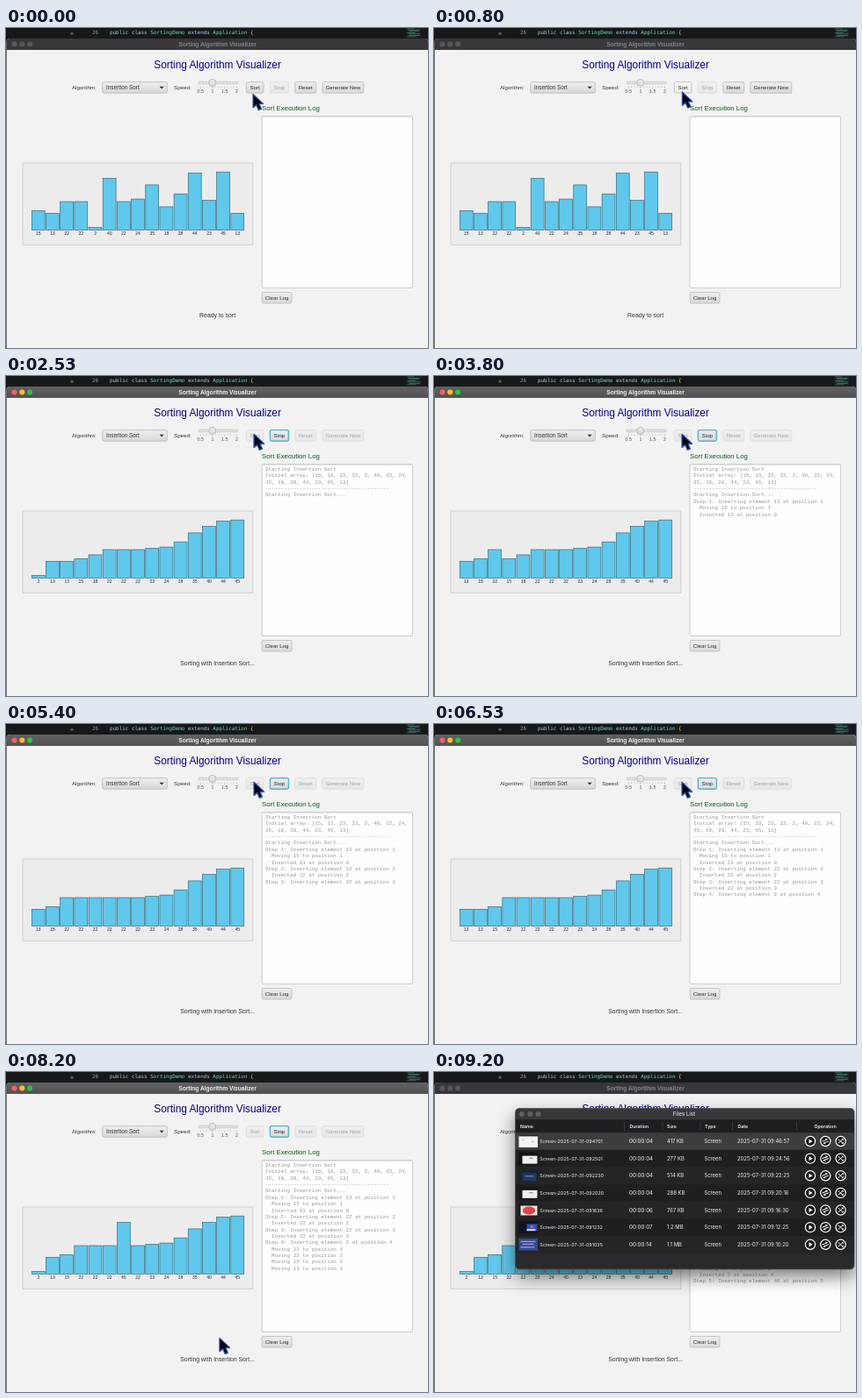
An HTML page for the animation above (9270 ms loop, 480 px wide and 365 px high).

```html
<!DOCTYPE html>
<html lang="en">
<head>
<meta charset="utf-8">
<title>Sorting Algorithm Visualizer</title>
<style>
html, body { margin: 0; width: 100%; height: 100%; overflow: hidden; background: #161819; }
svg { display: block; width: 480px; height: 365px; }
text { font-family: "Liberation Sans", Arial, sans-serif; white-space: pre; }
.mono { font-family: "Liberation Mono", "Courier New", monospace; }
.code { font-family: "DejaVu Sans Mono", monospace; }
.files text { font-family: Inter, "Liberation Sans", sans-serif; }
</style>
</head>
<body>
<script>
const LOOP = 9270, PRESS = 2000, START = 2130, TICK = 500, DIALOG = 9070;
const VALUES = [15, 13, 22, 22, 2, 40, 22, 24, 35, 18, 28, 44, 23, 45, 13];
const NS = "http://www.w3.org/2000/svg";

function add(parent, tag, attrs = {}, content) {
  const node = document.createElementNS(NS, tag);
  for (const key in attrs) node.setAttribute(key, attrs[key]);
  if (content !== undefined) node.textContent = content;
  parent.appendChild(node);
  return node;
}
const rect = (p, x, y, width, height, fill, more = {}) => add(p, "rect", { x, y, width, height, fill, ...more });
const circle = (p, cx, cy, r, fill, more = {}) => add(p, "circle", { cx, cy, r, fill, ...more });
const path = (p, d, more = {}) => add(p, "path", { d, ...more });
const text = (p, x, y, size, fill, str, more = {}) => add(p, "text", { x, y, "font-size": size, fill, ...more }, str);
const middle = { "text-anchor": "middle" };
const show = (node, on) => node.setAttribute("display", on ? "inline" : "none");

const svg = add(document.body, "svg", { viewBox: "0 0 480 365" });
const defs = add(svg, "defs");
function gradient(id, top, bottom) {
  const g = add(defs, "linearGradient", { id, x1: 0, y1: 0, x2: 0, y2: 1 });
  add(g, "stop", { offset: 0, "stop-color": top });
  add(g, "stop", { offset: 1, "stop-color": bottom });
}
gradient("face", "#eeeeee", "#d8d8d8");
gradient("hover", "#fafafa", "#e8e8e8");
gradient("activeBar", "#616163", "#525254");
const blur = add(defs, "filter", { id: "blur", x: "-20%", y: "-30%", width: "140%", height: "160%" });
add(blur, "feGaussianBlur", { stdDeviation: 10 });

// Editor strip behind the window
rect(svg, 0, 0, 480, 365, "#161819");
circle(svg, 75, 6.3, 1.8, "#55585b");
text(svg, 98, 6.6, 5.92, "#9a9fa3", "26", { class: "code" });
const code = add(svg, "text", { x: 118, y: 6.6, "font-size": 5.92, class: "code" });
[["public class ", "#a9d0ec"], ["SortingDemo ", "#68dcc0"], ["extends ", "#a9d0ec"],
 ["Application ", "#68dcc0"], ["{", "#f0d36a"]].forEach(([s, fill]) => add(code, "tspan", { fill }, s));
rect(svg, 455, 0, 17, 11, "#1c2224");
for (let i = 0; i < 7; i++)
  rect(svg, 456.5 + (i % 3), 0.5 + i * 1.5, 8 + (i * 5) % 7, 0.7, i % 2 ? "#3f8a72" : "#4d7076");

// Main window
path(svg, "M.6 365V16Q.6 12 4.6 12H476Q480 12 480 16V365Z", { fill: "#f2f2f2" });
const bar = path(svg, "M.6 25V16Q.6 12 4.6 12H476Q480 12 480 16V25Z");
const lights = [9.5, 18.3, 27.1].map(x => circle(svg, x, 18.5, 3, "#57565a"));
const barTitle = text(svg, 240.5, 20.6, 6.62, "", "Sorting Algorithm Visualizer", { ...middle, "font-weight": 700 });
text(svg, 240.6, 46, 11.85, "#00008b", "Sorting Algorithm Visualizer", middle);

text(svg, 75, 70, 6.15, "#333", "Algorithm:");
text(svg, 191, 70, 6.2, "#333", "Speed:");
const frame = { rx: 1.7, stroke: "#b4b4b4", "stroke-width": 0.7 };
rect(svg, 109.7, 61.6, 73.6, 12.6, "url(#face)", frame);
text(svg, 114, 70, 6.35, "#333", "Insertion Sort");
path(svg, "M174.6 66.7H179.6L177.1 69.5Z", { fill: "#333" });

// Speed slider
rect(svg, 219, 61.2, 45, 2.6, "#e4e4e4", { rx: 1.3, stroke: "#b8b8b8", "stroke-width": 0.6 });
for (let i = 0; i <= 12; i++) {
  const x = 221.3 + i * 3.43;
  path(svg, `M${x} 66.6V${i % 4 ? 68 : 69}`, { stroke: "#999", "stroke-width": 0.5 });
}
["0.5", "1", "1.5", "2"].forEach((s, i) => text(svg, 221.3 + i * 13.7, 73.9, 5.3, "#555", s, middle));
circle(svg, 234.7, 62.4, 4, "url(#face)", { stroke: "#a5a5a5", "stroke-width": 0.7 });

function button(x, y, w, label) {
  const g = add(svg, "g");
  const face = rect(g, x, y, w, 12.6, "url(#face)", frame);
  text(g, x + w / 2, y + 8.5, 6.15, "#2a2a2a", label, middle);
  return { g, face };
}
const sortBtn = button(273.3, 61.6, 19.6, "Sort");
const stopBtn = button(300.4, 61.6, 21, "Stop");
const resetBtn = button(328.7, 61.6, 24, "Reset");
const newBtn = button(359.8, 61.6, 47, "Generate New");
button(291.2, 301.5, 33.8, "Clear Log");

text(svg, 291, 94, 7.8, "#0a5a14", "Sort Execution Log");
rect(svg, 291, 100.7, 171.5, 195.7, "#fefefe", { rx: 1.3, stroke: "#c6c6c6", "stroke-width": 0.9 });
path(svg, "M292 101.5H461.5", { stroke: "#dedede", "stroke-width": 0.8 });
const status = text(svg, 240.6, 330.3, 6.9, "#333", "", middle);

// Bars
rect(svg, 19, 154, 261.8, 93.4, "#ececec", { stroke: "#cbcbcb", "stroke-width": 0.9 });
const BASE = 230.4, PITCH = 16.18;
const bars = VALUES.map((_, i) => ({
  box: rect(svg, 29.3 + i * PITCH, 0, 14.9, 0, "#5fc8ec", { stroke: "#35616f", "stroke-width": 0.65 }),
  label: text(svg, 36.8 + i * PITCH, 236.4, 5, "#222", "", middle)
}));

// Log lines and array writes both advance one per tick; writes land on the sorted array.
const lines = [], writes = [];
const work = VALUES.slice();
for (let i = 1; i < work.length; i++) {
  const key = work[i];
  let j = i;
  const put = (pos, v) => { work[pos] = v; writes.push([pos, v]); };
  lines.push(`Step ${i}: Inserting element ${key} at position ${i}`);
  while (j > 0 && work[j - 1] > key) {
    lines.push(`  Moving ${work[j - 1]} to position ${j}`);
    put(j, work[j - 1]);
    j--;
  }
  lines.push(`  Inserted ${key} at position ${j}`);
  put(j, key);
}
const head = ["Starting Insertion Sort", "Initial array: [" + VALUES.slice(0, 8).join(", ") + ",",
  VALUES.slice(8).join(", ") + "]", "-".repeat(40), "Starting Insertion Sort..."];
const ticks = Math.floor((LOOP - START) / TICK);
const logRows = head.concat(lines.slice(0, ticks)).map((s, i) =>
  text(svg, 295, 108 + i * 7.36, 5.87, "#949494", s, { class: "mono" }));
const sorted = VALUES.slice().sort((a, b) => a - b);

// Files window
const files = add(svg, "g", { class: "files" });
rect(files, 92, 50, 386, 184, "#000", { rx: 5, opacity: 0.5, filter: "url(#blur)" });
rect(files, 92.5, 41.5, 385.5, 183.5, "#2a2a2c", { rx: 4.5, stroke: "#555557", "stroke-width": 0.6 });
path(files, "M92.8 54.5V46Q92.8 41.8 97 41.8H473.5Q477.7 41.8 477.7 46V54.5Z", { fill: "#38373a" });
rect(files, 92.8, 54.5, 384.9, 15, "#1f1f21");
[99.8, 109.3, 118.8].forEach(x => circle(files, x, 48.1, 3, "#5e5e60"));
text(files, 284.5, 50.3, 6, "#c9c9cb", "Files List", { ...middle, "font-weight": 600 });
[["Name", 98], ["Duration", 222.5], ["Size", 265], ["Type", 308], ["Date", 345.5], ["Operation", 432.5]]
  .forEach(([s, x]) => text(files, x, 64.3, 5.25, "#f0f0f0", s, { "font-weight": 600 }));
[216.5, 260, 303, 339.5, 412.5].forEach(x => path(files, `M${x} 57V67`, { stroke: "#4a4a4c", "stroke-width": 0.6 }));

const glyph = { fill: "none", stroke: "#fff", "stroke-width": 1, "stroke-linejoin": "round" };
const headGlyph = { fill: "#fff" };
function icons(y) {
  const [play, swap, mix] = [428, 445.3, 462.6].map(x => add(files, "g", { transform: `translate(${x} ${y})` }));
  [play, swap, mix].forEach(g => circle(g, 0, 0, 5.6, "#161617", { stroke: "#fff", "stroke-width": 1.2 }));
  path(play, "M-1.5 -2.6L2.7 0L-1.5 2.6Z", headGlyph);
  const tilted = add(swap, "g", { transform: "rotate(-22)" });
  path(tilted, "M-3.4 -1.2H1.4M3.4 1.2H-1.4", glyph);
  path(tilted, "M1 -3.1L3.8 -1.2L1 -.4ZM-1 3.1L-3.8 1.2L-1 .4Z", headGlyph);
  path(mix, "M-2.8 -2.4L2.4 2.4M-2.8 2.4L2.4 -2.4", glyph);
  path(mix, "M.8 -3H3.2V-.6ZM.8 3H3.2V.6Z", headGlyph);
}
function thumb(i, y) {
  const box = (x, dy, w, h, fill) => rect(files, 96.5 + x, y - 7 + dy, w, h, fill);
  box(0, 0, 21.5, 14, ["#f6f2f4", "#101412", "#17242f", "#151816", "#151718", "#10141f", "#35488c"][i]);
  if (i === 0) { box(0, 0, 21.5, 1.4, "#2b2b2d"); box(4, 5, 2, 1, "#e89aa4"); box(14, 7, 3, 1, "#e89aa4"); }
  if (i === 1 || i === 3) { box(4, 4, 17, 9, "#f0f0ee"); box(12, 6, 4, 1.5, "#8cab8c"); }
  if (i === 2) { box(4, 4, 16, 9, "#20395c"); box(7, 7, 10, 1.2, "#5f83b4"); }
  if (i === 4) {
    box(2, 2, 19, 11, "#e9e4e2");
    add(files, "ellipse", { cx: 108, cy: y + 0.5, rx: 7.2, ry: 4.6, fill: "#e34347" });
  }
  if (i === 5) { box(9, 3, 12, 8, "#2b4fae"); box(13, 5, 4, 3, "#dd5560"); box(9, 9, 10, 2, "#dadde5"); }
  if (i === 6) { box(2, 3, 17, 1.2, "#94a9ed"); box(4, 6, 13, 1.2, "#b39be0"); box(2, 9, 16, 2, "#7488d6"); }
}
[["094701", "04", "417 KB", "09:46:57"], ["092501", "04", "277 KB", "09:24:56"],
 ["092230", "04", "514 KB", "09:22:25"], ["092020", "04", "288 KB", "09:20:16"],
 ["091636", "06", "767 KB", "09:16:30"], ["091232", "07", "1.2 MB", "09:12:25"],
 ["091035", "14", "1.1 MB", "09:10:20"]].forEach(([id, sec, size, time], i) => {
  const y = 79 + i * 19.63, cell = (x, fs, s) => text(files, x, y + 2.1, fs, "#f2f2f2", s);
  rect(files, 92.8, y - 9.8, 384.9, 19.63, i === 0 ? "#3d3d3f" : i % 2 ? "#1f1f21" : "#252527");
  thumb(i, y);
  cell(120.3, 5.4, "Screen-2025-07-31-" + id);
  cell(222, 6.2, "00:00:" + sec);
  cell(265, 5.9, size);
  cell(307.5, 5.8, "Screen");
  cell(345, 5.9, "2025-07-31 " + time);
  icons(y);
});

// Pointer
const pointer = add(svg, "g");
const arrow = "M0 0V15.2L3.7 12L6.2 18L9.4 16.6L6.9 10.9H11.6Z";
path(pointer, arrow, { fill: "#000", opacity: 0.2, transform: "translate(.8 1.2)" });
path(pointer, arrow, { fill: "#05060c", stroke: "#2a4fa8", "stroke-width": 1.2, "stroke-linejoin": "round" });
const route = [[0, 281, 75.5], [500, 281, 75.5], [1400, 285, 68], [1800, 285, 68],
  [2100, 282, 66.3], [8070, 282, 66.3], [8200, 243, 303], [8330, 232, 372]];
function pointerAt(t) {
  const k = route.findIndex(p => p[0] > t);
  if (k < 0) return route[route.length - 1].slice(1);
  const [t0, x0, y0] = route[k - 1], [t1, x1, y1] = route[k], u = (t - t0) / (t1 - t0);
  return [x0 + (x1 - x0) * u, y0 + (y1 - y0) * u];
}

function enable(btn, on) { btn.g.setAttribute("opacity", on ? 1 : 0.4); }

function draw(t) {
  const running = t >= START, active = t >= PRESS && t < DIALOG;
  const tick = running ? Math.floor((t - START) / TICK) : 0;
  const [px, py] = pointerAt(t);

  bar.setAttribute("fill", active ? "url(#activeBar)" : "#38373b");
  lights.forEach((l, i) => l.setAttribute("fill", active ? ["#fe5f57", "#febc2e", "#28c840"][i] : "#57565a"));
  barTitle.setAttribute("fill", active ? "#f0f0f0" : "#858488");

  [sortBtn, resetBtn, newBtn].forEach(b => enable(b, !running));
  enable(stopBtn, running);
  const over = !running && px > 273 && px < 293 && py > 61 && py < 74.5;
  sortBtn.face.setAttribute("fill", over ? "url(#hover)" : "url(#face)");
  stopBtn.face.setAttribute("stroke", running ? "#55b0d8" : "#b4b4b4");
  stopBtn.face.setAttribute("stroke-width", running ? 1.4 : 0.7);
  status.textContent = running ? "Sorting with Insertion Sort..." : "Ready to sort";

  const data = running ? sorted.slice() : VALUES;
  if (running) writes.slice(0, tick).forEach(([i, v]) => { data[i] = v; });
  bars.forEach(({ box, label }, i) => {
    const h = data[i] / 45 * 66.2;
    box.setAttribute("y", BASE - h);
    box.setAttribute("height", h);
    label.textContent = data[i];
  });
  logRows.forEach((row, i) => show(row, running && i < head.length + tick));

  show(files, t >= DIALOG);
  pointer.setAttribute("transform", `translate(${px} ${py})`);
}

const origin = performance.now();
function loop() {
  draw((performance.now() - origin) % LOOP);
  requestAnimationFrame(loop);
}
draw(0);
requestAnimationFrame(loop);
</script>
</body>
</html>
```
